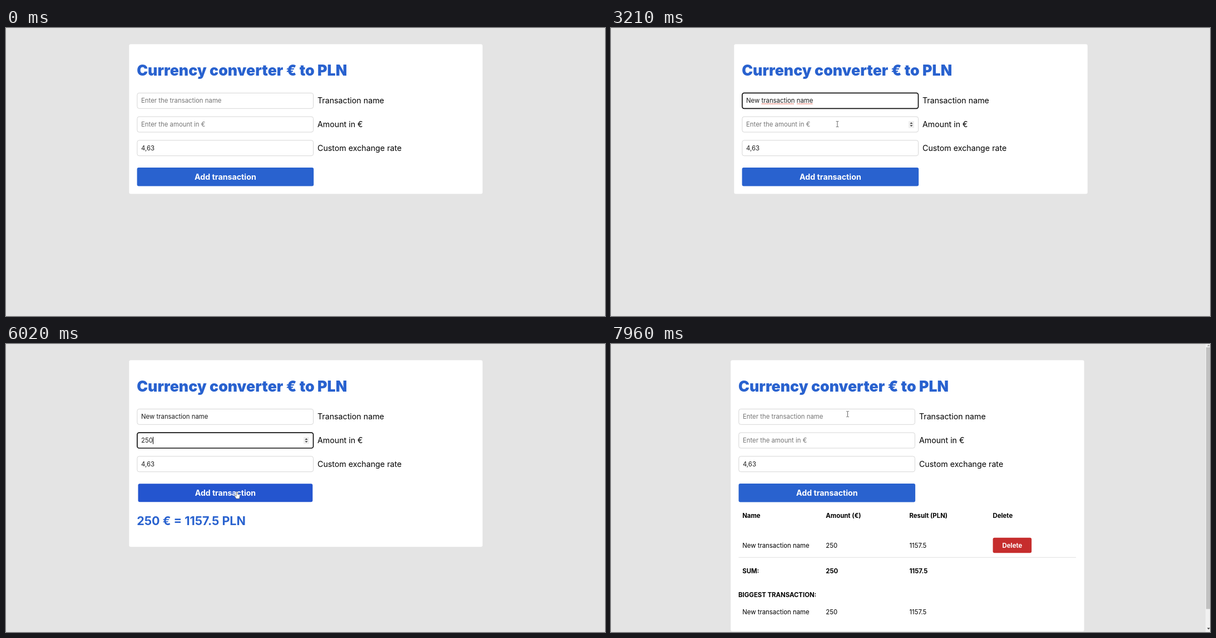
Write an HTML page that moves like this. It is 1077 px wide and 520 px high and loops after 8000 ms.

```html
<!DOCTYPE html>
<html lang="en">
<head>
<meta charset="utf-8">
<title>Currency converter</title>
<style>
  html, body { margin: 0; width: 100%; height: 100%; overflow: hidden; background: #e4e4e4; }
  svg { display: block; }
  text { font-family: Inter, sans-serif; font-optical-sizing: none; white-space: pre; }
</style>
</head>
<body>
<svg id="stage" width="1077" height="520" viewBox="0 0 1077 520"></svg>
<script>
const LOOP = 8000, BLUE = '#2962cf', SMALL = 11.38, BASE = 14.22;
const ROWS = [131.3, 174, 216.7];
const stage = document.getElementById('stage');

// Pointer path: time, x, y
const PATH = [
  [240, 899, 425], [310, 737, 300], [380, 575, 188], [640, 575, 188],
  [800, 560, 135], [960, 528, 92], [1100, 500, 86], [1240, 480, 110], [1380, 474, 131.5],
  [2860, 474, 131.5], [3210, 407, 173.5], [5320, 407, 173.5], [6080, 415, 267.5],
  [7410, 415, 267.5], [7960, 425.5, 126.5]
];
// Caret: from, to, x, row
const CARETS = [
  [1470, 2190, 243.5, 0], [2520, 3030, 363.5, 0], [3470, 4000, 243.5, 1], [4400, 4590, 250, 1],
  [4590, 4790, 257, 1], [4790, 5320, 264.5, 1], [5840, 6350, 264.5, 1]
];
const CLICKS = [[1470, 1730], [3470, 3740], [6750, 6880]];

const clamp = p => Math.max(0, Math.min(1, p));
const within = (t, [from, to]) => t >= from && t < to;
const smooth = p => p * p * (3 - 2 * p);
const easeOut = p => 1 - (1 - clamp(p)) ** 2;

// Text whose capitals are centred on the line y = mid
const text = (x, mid, str, { size = SMALL, weight = 400, fill = '#000', anchor = 'start' } = {}) =>
  `<text x="${x}" y="${(mid + 0.364 * size).toFixed(2)}" font-size="${size}" font-weight="${weight}" fill="${fill}" text-anchor="${anchor}">${str}</text>`;
const rect = (x, y, w, h, fill, r = 0, extra = '') =>
  `<rect x="${x}" y="${y}" width="${w}" height="${h}" rx="${r}" fill="${fill}" ${extra}/>`;
const path = (d, fill, extra = '') => `<path d="${d}" fill="${fill}" ${extra}/>`;

function pointerAt(t) {
  const i = PATH.findIndex(k => k[0] > t);
  if (i === 0) return null;
  if (i < 0) return PATH[PATH.length - 1].slice(1);
  const [t0, x0, y0] = PATH[i - 1], [t1, x1, y1] = PATH[i];
  let p = (t - t0) / (t1 - t0);
  if (t1 - t0 > 300) p = smooth(p);
  return [x0 + (x1 - x0) * p, y0 + (y1 - y0) * p];
}

function pointer(t) {
  const at = pointerAt(t);
  if (!at) return '';
  const [x, y] = at;
  const inside = x > 235 && x < 553;
  let shape;
  if (inside && ROWS.some(mid => Math.abs(y - mid) < 14.2)) {
    shape = path('M-2.3-5H-.7L0-4.5.7-5H2.3M-2.3 5H-.7L0 4.5.7 5H2.3M0-4.5V4.5', 'none', 'stroke="#555" stroke-width=".9"');
  } else if (inside && y > 252 && y < 285.5) {
    shape = path('M-1 .8Q0-.6 1 .8V5.2L4.6 6Q5.8 6.4 5.6 8L4.8 13.4H-.8L-4 8.8Q-4.2 7.4-2.8 7.6L-1 9Z',
      '#fff', 'stroke="#444" stroke-width=".6"');
  } else {
    shape = path('M.4.4V9.6L2.5 7.7 3.8 10.6 5.2 10 3.9 7.1H6.8Z', '#fff', 'stroke="#222" stroke-width=".7"');
  }
  const glow = CLICKS.some(c => within(t, c))
    ? `<circle cx="${x - 1}" cy="${t > 6000 ? y + 2.5 : y}" r="8.6" fill="#ff0" fill-opacity=".52"/>` : '';
  return `${glow}<g transform="translate(${x.toFixed(2)} ${y.toFixed(2)})">${shape}</g>`;
}

function squiggle(x0, x1) {
  let d = `M${x0} 137.5`;
  for (let x = x0 + 1.3, up = 1; x < x1; x += 1.3, up = !up) d += `L${x.toFixed(1)} ${up ? 136.3 : 137.5}`;
  return path(d, 'none', 'stroke="#e0402c" stroke-width=".8"');
}

function field(row, value, hint, label, focused) {
  const mid = ROWS[row];
  const border = focused ? 'stroke="#111" stroke-width="1.7"' : 'stroke="#d6d6d6" stroke-width="1"';
  return rect(235.9, mid - 13.9, 316.6, 27.9, '#fff', 3.5, border)
    + text(243, mid, value || hint, { fill: value ? '#1c1c1c' : '#757575' })
    + text(560, mid, label, { size: BASE });
}

const spinner = () => rect(535, 168, 10, 12.5, '#efefef')
  + path('M537.4 172.9 540 170.2 542.6 172.9ZM537.4 175.3 540 178 542.6 175.3Z', '#444');

function addButton(t) {
  const hover = t < 7000 ? easeOut((t - 5900) / 500) : 1 - easeOut((t - 7500) / 450);
  const scale = 1 - 0.028 * hover;
  const fill = `rgb(${41 - 12 * hover},${98 - 31 * hover},207)`;
  return `<g transform="translate(394.4 268.8) scale(${scale.toFixed(4)})">`
    + rect(-158.8, -16.8, 317.6, 33.5, fill, 3)
    + text(0, 0, 'Add transaction', { size: BASE, weight: 700, fill: '#fff', anchor: 'middle' }) + '</g>';
}

function table() {
  const row = (mid, cells, weight) =>
    cells.map((cell, i) => text(242.3 + 150.1 * i, mid, cell, { weight })).join('');
  const entry = ['New transaction name', '250', '1157.5'];
  return row(310.3, ['Name', 'Amount (€)', 'Result (PLN)', 'Delete'], 700)
    + row(363.6, entry)
    + rect(692.7, 349.8, 69.6, 27.4, '#c62d2d', 3)
    + text(727.5, 363.6, 'Delete', { weight: 700, fill: '#fff', anchor: 'middle' })
    + rect(235.6, 384.8, 606.5, 1, '#e0e0e0')
    + row(409.7, ['SUM:', '250', '1157.5'], 700)
    + text(235.2, 452.6, 'BIGGEST TRANSACTION:', { weight: 700 })
    + row(483.7, entry);
}

const scrollbar = () => rect(1069, 0, 8, 520, '#f1f1f1') + rect(1070, 6, 7, 472.5, '#c1c1c1')
  + path('M1071.8 4 1074.4 1.2 1077 4Z', '#a0a0a0') + path('M1071.8 512.6 1074.4 515.6 1077 512.6Z', '#404040');

function draw(t) {
  const saved = t >= 6880;
  const name = t >= 2520 && !saved ? 'New transaction name' : '';
  const amount = saved || t < 4400 ? '' : t < 4590 ? '2' : t < 4790 ? '25' : '250';
  const focus = within(t, [1470, 3470]) ? 0 : within(t, [3470, 6750]) ? 1 : -1;
  const height = saved ? 489.5 : amount ? 337 : 270.3;

  let page = rect(221.3, 29.2, 635.5, height, '#fff', 3)
    + text(235.2, 76.6, 'Currency converter € to PLN', { size: 26.67, weight: 900, fill: BLUE })
    + field(0, name, 'Enter the transaction name', 'Transaction name', focus === 0)
    + field(1, amount, 'Enter the amount in €', 'Amount in €', focus === 1)
    + field(2, '4,63', '', 'Custom exchange rate', false)
    + addButton(t);
  if (within(t, [2730, 3470])) page += squiggle(270.5, 330) + squiggle(334, 363);
  if (within(t, [3100, 6750])) page += spinner();
  if (amount) {
    const result = +(amount * 4.63).toFixed(2);
    page += text(235.2, 319, `${amount} € = ${result} PLN`, { size: 21.5, weight: 700, fill: BLUE });
  }
  const caret = CARETS.find(c => within(t, c));
  if (caret) page += rect(caret[2] - 0.5, ROWS[caret[3]] - 6.3, 1, 13, '#000');
  if (saved) page += table();

  stage.innerHTML = `<g transform="translate(${saved ? -6.1 : 0} 0)">${page}</g>`
    + (saved ? scrollbar() : '') + pointer(t);
}

const start = performance.now();
function tick() {
  draw((performance.now() - start) % LOOP);
  requestAnimationFrame(tick);
}
tick();
</script>
</body>
</html>
```
